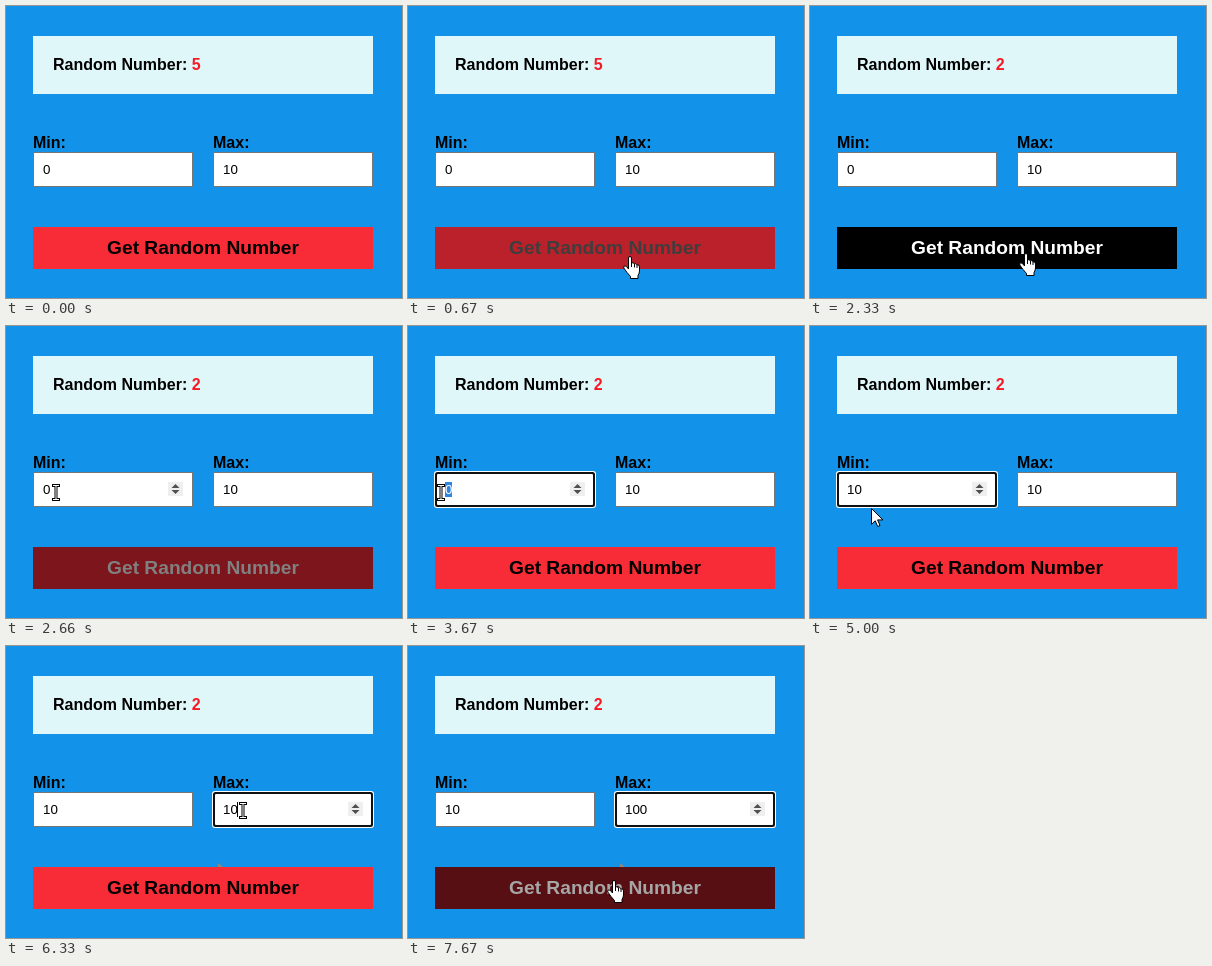
An HTML page with a canvas for the animation above (8000 ms loop, 396 by 292 pixels).

```html
<!DOCTYPE html>
<html lang="en">
<head>
<meta charset="utf-8">
<title>Random number</title>
<style>
  html, body { margin: 0; width: 100%; height: 100%; overflow: hidden; background: #1292e8; }
  canvas { display: block; width: 396px; height: 292px; }
</style>
</head>
<body>
<canvas id="stage" width="396" height="292"></canvas>
<script>
const ctx = document.getElementById('stage').getContext('2d');
const FONT = '"Liberation Sans", Arial, sans-serif';
const LOOP = 8000;

// Each step patches the state; "shade" is how far the button has faded to black.
const steps = [
  [0, { num: 5, min: '0', max: '10', shade: 0, focus: '', hover: '', caret: false,
        selected: false, trail: false, cursor: null }],
  [670, { shade: 0.245, cursor: ['hand', 215, 250] }],
  [990, { shade: 1, cursor: ['hand', 209, 247] }],
  [1330, { num: 8 }],
  [2330, { num: 2 }],
  [2660, { shade: 0.5, hover: 'min', cursor: ['beam', 46, 158] }],
  [3000, { shade: 0, focus: 'min', caret: true }],
  [3330, { caret: false, selected: true, cursor: ['beam', 31, 154] }],
  [3670, { cursor: ['beam', 29, 158] }],
  [4340, { min: '1', selected: false, caret: true }],
  [4670, { min: '10' }],
  [5000, { caret: false, hover: '', cursor: ['arrow', 61, 182] }],
  [5350, { shade: 0.845, cursor: ['arrow', 212, 217] }],
  [5670, { shade: 0, hover: 'max', trail: true, cursor: ['beam', 239, 159] }],
  [6000, { focus: 'max', caret: true }],
  [6330, { cursor: ['beam', 233, 156] }],
  [6670, { caret: false }],
  [7000, { max: '100', caret: true }],
  [7330, { caret: false, cursor: ['beam', 219, 163] }],
  [7670, { shade: 0.65, hover: '', cursor: ['hand', 199, 234] }]
];

const hand = new Path2D('M5.5 13V2Q5.5.5 7 .5T8.5 2V7Q10 6 11.3 7.8 13 7 14 8.8 16.5 8.5 16.5 11V15' +
  'Q16.5 17 15 19.5V22.5H7.5V20.5L4 16.5 .8 12Q.2 10 2 9.8 3.5 10 5.5 13Z');
const knuckles = new Path2D('M8.5 7V11M11.5 8V11.5M14 9V12');
const arrow = new Path2D('M.5.5V16.3L4.2 12.8 6.7 18.5 9 17.5 6.6 11.9H11.9Z');

function stateAt(t) {
  const state = {};
  for (const [start, patch] of steps) if (t >= start) Object.assign(state, patch);
  return state;
}

function rect(x, y, w, h, color) {
  ctx.fillStyle = color;
  ctx.fillRect(x, y, w, h);
}

function round(x, y, w, h, r, color) {
  ctx.fillStyle = color;
  ctx.beginPath();
  ctx.roundRect(x, y, w, h, r);
  ctx.fill();
}

function text(str, x, y, size, color, weight = 'bold', align = 'left') {
  ctx.font = `${weight} ${size}px ${FONT}`;
  ctx.textAlign = align;
  ctx.fillStyle = color;
  ctx.fillText(str, x, y);
  return ctx.measureText(str).width;
}

function triangle(x, y, w, h, color) {
  ctx.fillStyle = color;
  ctx.beginPath();
  ctx.moveTo(x - w / 2, y);
  ctx.lineTo(x + w / 2, y);
  ctx.lineTo(x, y + h);
  ctx.fill();
}

function spinner(x) {
  rect(x, 156, 15, 14, '#efefef');
  triangle(x + 7.5, 162, 8, -4, '#505050');
  triangle(x + 7.5, 164, 8, 4, '#505050');
}

function field(name, label, x, state) {
  const focused = state.focus === name;
  const value = state[name];
  text(label, x, 142, 16, '#000');
  if (focused) {
    round(x - 1, 145, 162, 37, 3, '#fff');
    round(x, 146, 160, 35, 2.5, '#101010');
    round(x + 2, 148, 156, 31, 1, '#fff');
  } else {
    rect(x, 146, 160, 35, '#767676');
    rect(x + 1, 147, 158, 33, '#fff');
  }
  if (focused || state.hover === name) spinner(x + 135);
  const selected = focused && state.selected;
  if (selected) rect(x + 10, 156, 7, 15, '#2f86e0');
  const width = text(value, x + 10, 168, 13.333, selected ? '#fff' : '#000', 'normal');
  if (focused && state.caret) rect(x + 10 + Math.floor(width), 156, 1, 15, '#000');
}

function beam() {
  rect(0, 0, 8, 3, '#000');
  rect(0, 14, 8, 3, '#000');
  rect(2.5, 1, 3, 15, '#000');
  rect(1, 1, 6, 1, '#fff');
  rect(1, 15, 6, 1, '#fff');
  rect(3.5, 1, 1, 15, '#fff');
}

function outline(path) {
  ctx.fillStyle = '#fff';
  ctx.strokeStyle = '#000';
  ctx.lineWidth = 1;
  ctx.fill(path);
  ctx.stroke(path);
}

function pointer([kind, x, y]) {
  ctx.save();
  ctx.translate(x, y);
  if (kind === 'beam') beam();
  else if (kind === 'arrow') outline(arrow);
  else {
    outline(hand);
    ctx.stroke(knuckles);
  }
  ctx.restore();
}

function button(shade) {
  const [r, g, b] = [248, 44, 55].map(c => Math.round(c * (1 - shade)));
  const ink = Math.round(255 * shade);
  rect(27, 221, 340, 42, `rgb(${r},${g},${b})`);
  text('Get Random Number', 197, 248, 19.2, `rgb(${ink},${ink},${ink})`, 'bold', 'center');
}

function draw(t) {
  const state = stateAt(t);
  rect(0, 0, 396, 292, '#1292e8');
  rect(27, 30, 340, 58, '#e0f7fa');
  const width = text('Random Number: ', 47, 64, 16, '#000');
  text(state.num, 47 + width, 64, 16, '#f61a26');
  field('min', 'Min:', 27, state);
  field('max', 'Max:', 207, state);
  if (state.trail) {
    ctx.fillStyle = '#8f8780';
    ctx.beginPath();
    ctx.moveTo(212, 217);
    ctx.lineTo(217, 221);
    ctx.lineTo(212, 221);
    ctx.fill();
  }
  button(state.shade);
  if (state.cursor) pointer(state.cursor);
}

const begin = performance.now();
function tick() {
  draw((performance.now() - begin) % LOOP);
  requestAnimationFrame(tick);
}
tick();
</script>
</body>
</html>
```
